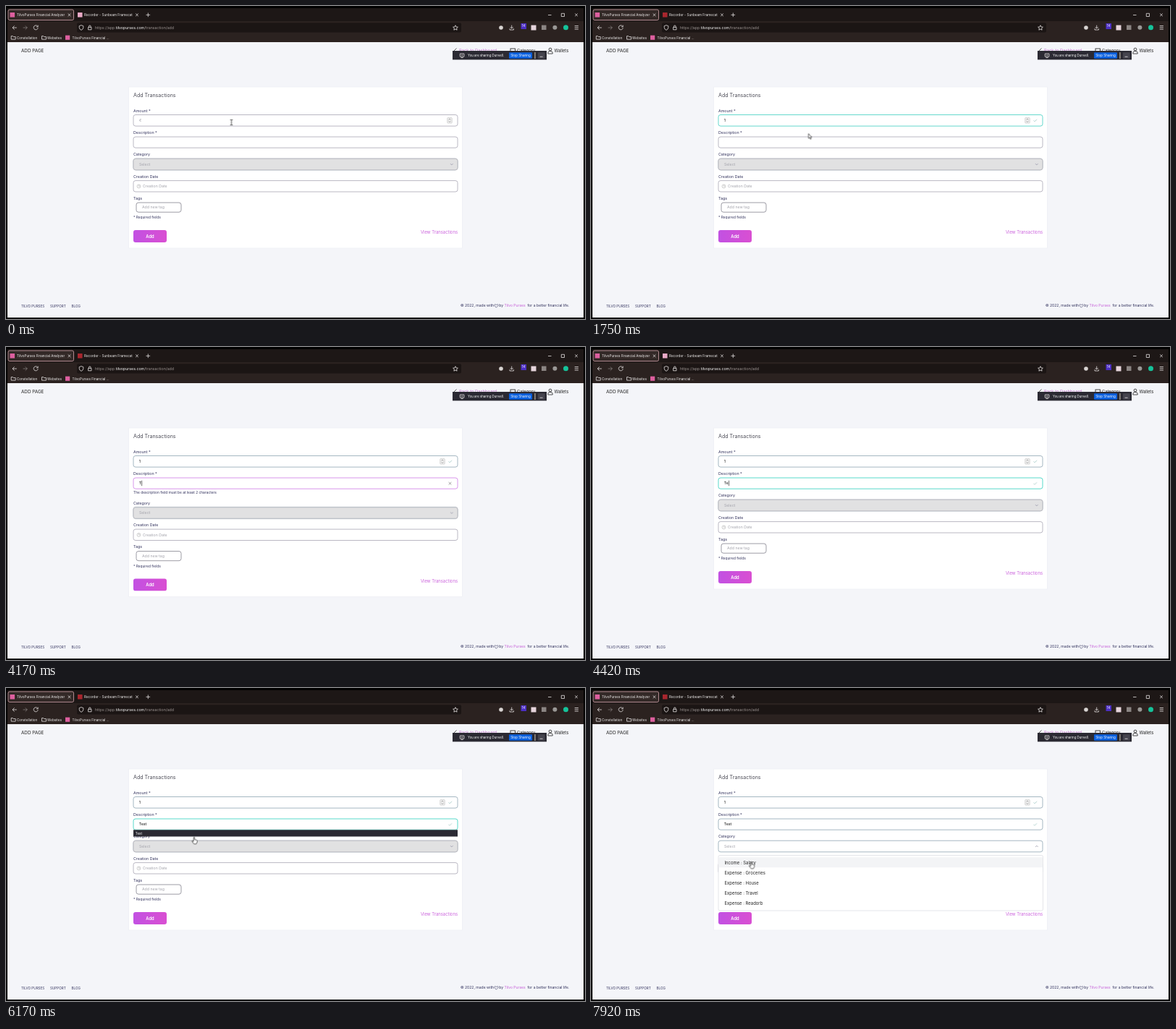
These frames come from a looping animation (800x433 px, 8 s). An HTML page:

```html
<!DOCTYPE html>
<html lang="en">
<head>
<meta charset="utf-8">
<title>Add Transactions</title>
<style>
html, body { margin: 0; height: 100%; overflow: hidden; background: #000; }
svg { display: block; width: 100vw; height: 100vh; font-family: Inter, "Open Sans", sans-serif; }
text { white-space: pre; }
.chrome { fill: #f1efee; font-size: 4.6px; }
.line { fill: none; stroke: #e6e3e2; stroke-width: .8; }
.label { fill: #32325d; font-size: 5.3px; }
.hint { fill: #a3a3ab; font-size: 5.2px; }
.value { fill: #222; font-size: 5.1px; font-weight: 500; }
.foot { fill: #32325d; font-size: 4.6px; }
.note { font-size: 5.05px; fill: #32325d; }
.item { fill: #222; font-size: 5.95px; }
.box { fill: #fff; stroke: #a9a6b4; stroke-width: .8; }
.mark { fill: none; stroke: #8fbdb8; stroke-width: .7; }
.caret { fill: #222; }

/* One shared clock: 1% = 80 ms */
.t { animation: 8s step-end infinite; }
.recIdle { animation-name: recIdle; }
.recLive { animation-name: recLive; }
.empty { animation-name: empty; }
.filled { animation-name: filled; }
.amountBox { animation-name: amountBox; }
.amountCaret { animation-name: amountCaret; }
.descBox { animation-name: descBox; }
.typing { animation-name: typing; }
.descCaret { animation-name: descCaret; }
.invalid { animation-name: invalid; }
.valid { animation-name: valid; }
.suggest { animation-name: suggest; }
.push { animation-name: push; }
.grow { animation-name: grow; }
.closed { animation-name: closed; }
.open { animation-name: open; }
.ibeam { animation-name: ibeam; }
.arrow { animation-name: arrow; }
.hand { animation-name: hand; }
.pointer { animation: pointer 8s ease-in-out infinite; }

@keyframes recIdle { 0%, 12%, 31.25%, 55%, 68.75%, 81.25%, 93.75% { opacity: 1 } 5.25%, 18.75%, 42.75%, 62.5%, 75%, 87.5%, 97.5%, 100% { opacity: 0 } }
@keyframes recLive { 0%, 12%, 31.25%, 55%, 68.75%, 81.25%, 93.75% { opacity: 0 } 5.25%, 18.75%, 42.75%, 62.5%, 75%, 87.5%, 97.5%, 100% { opacity: 1 } }
@keyframes empty { 0% { opacity: 1 } 16.6%, 100% { opacity: 0 } }
@keyframes filled { 0% { opacity: 0 } 16.6%, 100% { opacity: 1 } }
@keyframes amountBox { 0% { stroke: #a9a6b4 } 3.1% { stroke: #cf7be6 } 16.6% { stroke: #3fcfc0 } 31.25%, 100% { stroke: #8ea5b3 } }
@keyframes amountCaret {
  0%, 8.4% { opacity: 0; transform: none }
  3.1%, 14.6% { opacity: 1; transform: none }
  16.6% { opacity: 1; transform: translateX(3px) }
  21%, 100% { opacity: 0; transform: translateX(3px) }
}
@keyframes descBox { 0% { stroke: #a9a6b4 } 31.25% { stroke: #cf7be6 } 54.1% { stroke: #2fd0bd } 94.7%, 100% { stroke: #8ea5b3 } }
@keyframes typing {
  0% { transform: none } 48.75% { transform: translateX(3.2px) } 54.1% { transform: translateX(6.2px) }
  56.2% { transform: translateX(8.8px) } 58.4%, 100% { transform: translateX(10.8px) }
}
@keyframes descCaret { 0%, 37.5%, 63%, 76.5%, 90%, 100% { opacity: 0 } 31.25%, 42.7%, 69.75%, 83.25% { opacity: 1 } }
@keyframes invalid { 0% { opacity: 0 } 48.75% { opacity: 1 } 54.1%, 100% { opacity: 0 } }
@keyframes valid { 0% { opacity: 0 } 54.1%, 100% { opacity: 1 } }
@keyframes suggest { 0% { opacity: 0 } 56.2% { opacity: 1 } 94.7%, 100% { opacity: 0 } }
@keyframes push { 0% { transform: none } 48.75% { transform: translateY(10.5px) } 54.1%, 100% { transform: none } }
@keyframes grow { 0% { height: 223px } 48.75% { height: 233.5px } 54.1%, 100% { height: 223px } }
@keyframes closed { 0% { opacity: 1 } 94.7%, 100% { opacity: 0 } }
@keyframes open { 0% { opacity: 0 } 94.7%, 100% { opacity: 1 } }
@keyframes ibeam { 0%, 24.4% { opacity: 1 } 18.75%, 42.7%, 100% { opacity: 0 } }
@keyframes arrow { 0% { opacity: 0 } 18.75% { opacity: 1 } 24.4%, 100% { opacity: 0 } }
@keyframes hand { 0% { opacity: 0 } 73% { opacity: 1 } 100% { opacity: 1 } }
@keyframes pointer {
  0%, 17% { transform: translate(311.5px, 161px) }
  21.8% { transform: translate(300.5px, 176.5px) }
  30%, 70% { transform: translate(292px, 185px) }
  83%, 94.7% { transform: translate(237px, 221.5px) }
  98%, 100% { transform: translate(221.5px, 240.5px) }
}
</style>
</head>
<body>
<svg viewBox="0 0 800 433" preserveAspectRatio="none">
  <defs>
    <linearGradient id="pink"><stop stop-color="#c251e2"/><stop offset="1" stop-color="#d94fd2"/></linearGradient>
    <path id="tick" d="M-2 0l1.5 1.5 3-3"/>
    <path id="cross" d="M-1.8-1.8l3.6 3.6M1.8-1.8l-3.6 3.6"/>
    <path id="chevron" d="M-1.8-.9l1.8 1.8 1.8-1.8"/>
    <path id="folder" d="M-3-2h2.2l.8 1h3v3.5h-6z"/>
    <g id="spinner">
      <rect x="-3.3" y="-3.8" width="6.6" height="7.6" rx="1" fill="#eee" stroke="#bbb" stroke-width=".5"/>
      <path d="M-1.4-.9l1.4-1.4 1.4 1.4M-1.4.9l1.4 1.4 1.4-1.4" fill="none" stroke="#777" stroke-width=".6"/>
    </g>
  </defs>

  <!-- Browser window -->
  <rect x="2" y="3" width="796" height="428" fill="#f4f5f9"/>
  <rect x="2" y="3" width="796" height="18" fill="#1d1716"/>
  <rect x="2" y="21" width="796" height="29" fill="#2b2220"/>
  <rect x="3" y="5" width="90.5" height="14.5" rx="2" fill="#332927" stroke="#d3a5ac" stroke-width=".8"/>
  <rect x="5.5" y="9" width="6.5" height="6.5" fill="#dd5f9f"/>
  <text class="chrome" x="15" y="14.2">TilvoPurses Financial Analyzer</text>
  <use href="#cross" class="line" x="87.5" y="12.3"/>
  <rect class="t recIdle" x="99" y="9" width="6.5" height="6.5" fill="#e9a9c6"/>
  <rect class="t recLive" x="99" y="9" width="6.5" height="6.5" fill="#a8262e"/>
  <text class="chrome" x="108" y="14.2">Recorder - Sunbeam Framecat</text>
  <use href="#cross" class="line" x="181" y="12.3"/>
  <path class="line" d="M193.5 12.3h5.6M196.3 9.5v5.6M749 12.5h4.5M767.3 10.3h4.2v4.2h-4.2z"/>
  <use href="#cross" class="line" x="788" y="12.3"/>

  <path class="line" d="M14.8 30H9m2.6-2.6L9 30l2.6 2.6"/>
  <path class="line" opacity=".45" d="M23.5 30h5.8m-2.6-2.6l2.6 2.6-2.6 2.6"/>
  <path class="line" d="M43.6 28a3 3 0 1 0 .6 2.2M44.2 26.6v2.2H42"/>
  <rect x="98" y="23.2" width="531" height="13.4" rx="2" fill="#1b1514"/>
  <path class="line" d="M104 26.6l2.8 1v2.2q0 2.2-2.8 3.6-2.8-1.4-2.8-3.6v-2.2zM113.6 29.4h4.4v3.4h-4.4zM114.5 29.4v-1.2a1.3 1.3 0 0 1 2.6 0v1.2"/>
  <text font-size="5.25" x="123" y="31.9" fill="#9c9492">https://app.<tspan fill="#fff">tilvopurses.com</tspan>/transaction/add</text>
  <path class="line" d="M621 26.7l1 2.2 2.4.3-1.8 1.6.5 2.4-2.1-1.2-2.1 1.2.5-2.4-1.8-1.6 2.4-.3z"/>
  <circle cx="684" cy="30" r="2.8" fill="#d8d4d2"/>
  <path class="line" d="M698.7 26.6v4.4m-2-1.9l2 2 2-2M696 31.2v1.8h5.4v-1.8"/>
  <rect x="711.5" y="24" width="7.5" height="8" fill="#4c2fc4"/>
  <text x="712.7" y="28.6" font-size="4.3" fill="#fff">14</text>
  <rect x="725.5" y="26.5" width="7" height="7" fill="#e6d5dc"/>
  <rect x="740" y="26.5" width="6.5" height="6.5" fill="#8b8583"/>
  <circle cx="758.4" cy="29.8" r="3" fill="#9a9896"/>
  <circle cx="773.5" cy="29.8" r="3.5" fill="#15c39a"/>
  <path class="line" d="M785.7 27.5h5.2M785.7 29.8h5.2M785.7 32.1h5.2"/>

  <use href="#folder" class="line" x="10.2" y="43.6"/>
  <text class="chrome" x="15" y="45.8">Constellation</text>
  <use href="#folder" class="line" x="52.5" y="43.6"/>
  <text class="chrome" x="57" y="45.8">Websites</text>
  <rect x="82" y="40.6" width="6.2" height="6.2" fill="#dd5f9f"/>
  <text class="chrome" x="91.5" y="45.8">TilvoPurses Financial ...</text>

  <!-- Page header and footer -->
  <text x="21" y="64" font-size="6.3" fill="#222">ADD PAGE</text>
  <path d="M622.5 58.5l-3.5 3.5 3.5 3.5" fill="none" stroke="#333" stroke-width=".8"/>
  <text x="626" y="64" font-size="5.8" fill="#c77fd0">Back to Dashboard</text>
  <rect x="697" y="59" width="6.5" height="6" fill="none" stroke="#333" stroke-width=".9"/>
  <text x="706" y="64" font-size="5.8" fill="#333">Category</text>
  <g fill="none" stroke="#222" stroke-width=".8"><circle cx="752" cy="60" r="1.9"/><path d="M748.8 66v-1q0-2.4 2.2-2.4h2q2.2 0 2.2 2.4v1z"/></g>
  <text x="757.5" y="64" font-size="5.8" fill="#222">Wallets</text>
  <text class="foot" x="21" y="416.8">TILVO PURSES</text>
  <text class="foot" x="61" y="416.8">SUPPORT</text>
  <text class="foot" x="90.5" y="416.8">BLOG</text>
  <g class="note">
    <text x="628" y="416.3">© 2022, made with</text>
    <path d="M677.4 417.2l-2.3-2.4c-1.2-1.6 1.2-3 2.3-1.2 1.1-1.8 3.5-.4 2.3 1.2z" fill="none" stroke="#32325d" stroke-width=".6"/>
    <text x="681.2" y="416.3">by <tspan fill="#c65fd8">Tilvo Purses</tspan></text>
    <text x="778.5" y="416.3" text-anchor="end">for a better financial life.</text>
  </g>

  <!-- Form -->
  <rect class="t grow" x="169.5" y="112" width="461" height="223" fill="#fff" stroke="#eeeff4" stroke-width=".8"/>
  <text x="176" y="126" font-size="7.1" fill="#4a4a55">Add Transactions</text>

  <text class="label" x="176" y="146.7">Amount *</text>
  <rect class="box t amountBox" x="176" y="150.5" width="448" height="15.6" rx="3"/>
  <g class="t empty"><text class="hint" x="184" y="160.2">€</text><use href="#spinner" x="613" y="158.3"/></g>
  <g class="t filled">
    <text class="value" x="183.7" y="160.2">1</text>
    <use href="#spinner" x="603" y="158.3"/>
    <use href="#tick" class="mark" x="613.5" y="158.3"/>
  </g>
  <rect class="caret t amountCaret" x="183.8" y="154.5" width=".7" height="7.5"/>

  <text class="label" x="176" y="176.9">Description *</text>
  <rect class="box t descBox" x="176" y="181" width="448" height="15.2" rx="3"/>
  <text class="value" x="183.8" y="190.4">Test</text>
  <g class="t typing">
    <rect x="183.8" y="184" width="13" height="9.5" fill="#fff"/>
    <rect class="caret t descCaret" x="183.9" y="184.7" width=".7" height="7.5"/>
  </g>
  <g class="t invalid">
    <use href="#cross" x="613.5" y="188.7" fill="none" stroke="#777" stroke-width=".7"/>
    <text x="176" y="202.9" font-size="4.85" fill="#32325d">The description field must be at least 2 characters</text>
  </g>
  <use href="#tick" class="mark t valid" x="613.5" y="188.7"/>

  <g class="t push">
    <text class="label" x="176" y="207.2">Category</text>
    <rect class="box" x="176" y="211.2" width="448" height="15.6" rx="3" style="stroke:#8ea5b3"/>
    <rect class="t closed" x="176" y="211.2" width="448" height="15.6" rx="3" fill="#e1e1e2" stroke="#b5b3ba" stroke-width=".8"/>
    <text class="hint" x="184" y="220.9">Select</text>
    <use href="#chevron" class="line t closed" x="615.8" y="219" style="stroke:#99a"/>
    <text class="label" x="176" y="237.5">Creation Date</text>
    <rect class="box" x="176" y="241.6" width="448" height="15.4" rx="3"/>
    <g fill="none" stroke="#aaa" stroke-width=".6"><circle cx="183.5" cy="249.4" r="2.4"/><path d="M183.5 247.8v1.6h1.3"/></g>
    <text class="hint" x="189" y="251.2">Creation Date</text>
    <text class="label" x="176" y="267.8">Tags</text>
    <rect class="box" x="180" y="272" width="62" height="13.2" rx="3" style="stroke:#85838e"/>
    <text class="hint" x="188" y="280.4">Add new tag</text>
    <text x="176" y="294.2" font-size="4.8" fill="#32325d">* Required fields</text>
    <rect x="176" y="310" width="46" height="17" rx="3" fill="url(#pink)"/>
    <text x="199" y="320.8" font-size="5.8" font-weight="600" fill="#fff" text-anchor="middle">Add</text>
    <text x="624" y="315" font-size="5.9" fill="#cb62dc" text-anchor="end">View Transactions</text>
  </g>

  <g class="t suggest">
    <rect x="176" y="196.3" width="448" height="9.2" fill="#2b2a33"/>
    <text x="178.8" y="202.7" font-size="4.6" fill="#fff">Test</text>
  </g>

  <g class="t open">
    <path class="line" d="M614 219.9l1.8-1.8 1.8 1.8" style="stroke:#99a"/>
    <rect x="176" y="231.5" width="448.5" height="76.5" rx="2" fill="#fff" stroke="#dddfe5" stroke-width=".8"/>
    <rect x="176.4" y="234.3" width="447.7" height="14" fill="#f3f4f6"/>
    <text class="item" x="184.5" y="243.5">Income : Salary</text>
    <text class="item" x="184.5" y="257.7">Expense : Groceries</text>
    <text class="item" x="184.5" y="271.9">Expense : House</text>
    <text class="item" x="184.5" y="286.1">Expense : Travel</text>
    <text class="item" x="184.5" y="300.3">Expense : Readorb</text>
  </g>

  <!-- Screen sharing bar -->
  <rect x="617" y="62" width="130" height="12.3" fill="#2b2a33"/>
  <path class="line" d="M627.3 66h5.6v4h-5.6zM628.5 71.5h3.2M630.1 69v-2"/>
  <text x="638" y="70.2" font-size="4.4" fill="#fff">You are sharing Dunvell.</text>
  <rect x="695" y="64.2" width="32" height="8.6" rx="1" fill="#0a60df"/>
  <text x="711" y="70.2" font-size="4.55" fill="#fff" text-anchor="middle">Stop Sharing</text>
  <rect x="730.5" y="64" width=".9" height="9" fill="#e8dcc0"/>
  <rect x="735" y="64.2" width="9.5" height="8.6" rx="1" fill="#45444e"/>
  <path class="line" d="M737.6 70.2h4"/>

  <g class="pointer">
    <path class="t ibeam" d="M-1.7-3.6h1.2l.5.4.5-.4h1.2M0-3.2v6.4M-1.7 3.6h1.2l.5-.4.5.4h1.2" fill="none" stroke="#222" stroke-width=".8"/>
    <path class="t arrow" d="M0 0v6.6l1.5-1.3 1.1 2.4 1.1-.5-1.1-2.3h2z" fill="#fff" stroke="#222" stroke-width=".7"/>
    <path class="t hand" d="M-.8.8q0-1 .8-1t.8 1v2.7l2.6.6q1 .2 1 1.2l-.5 2.4-.9 1.6h-3.3l-2.6-3.3q-.5-1 .5-1l1.6 1z" fill="#fff" stroke="#222" stroke-width=".7"/>
  </g>
</svg>
</body>
</html>
```
